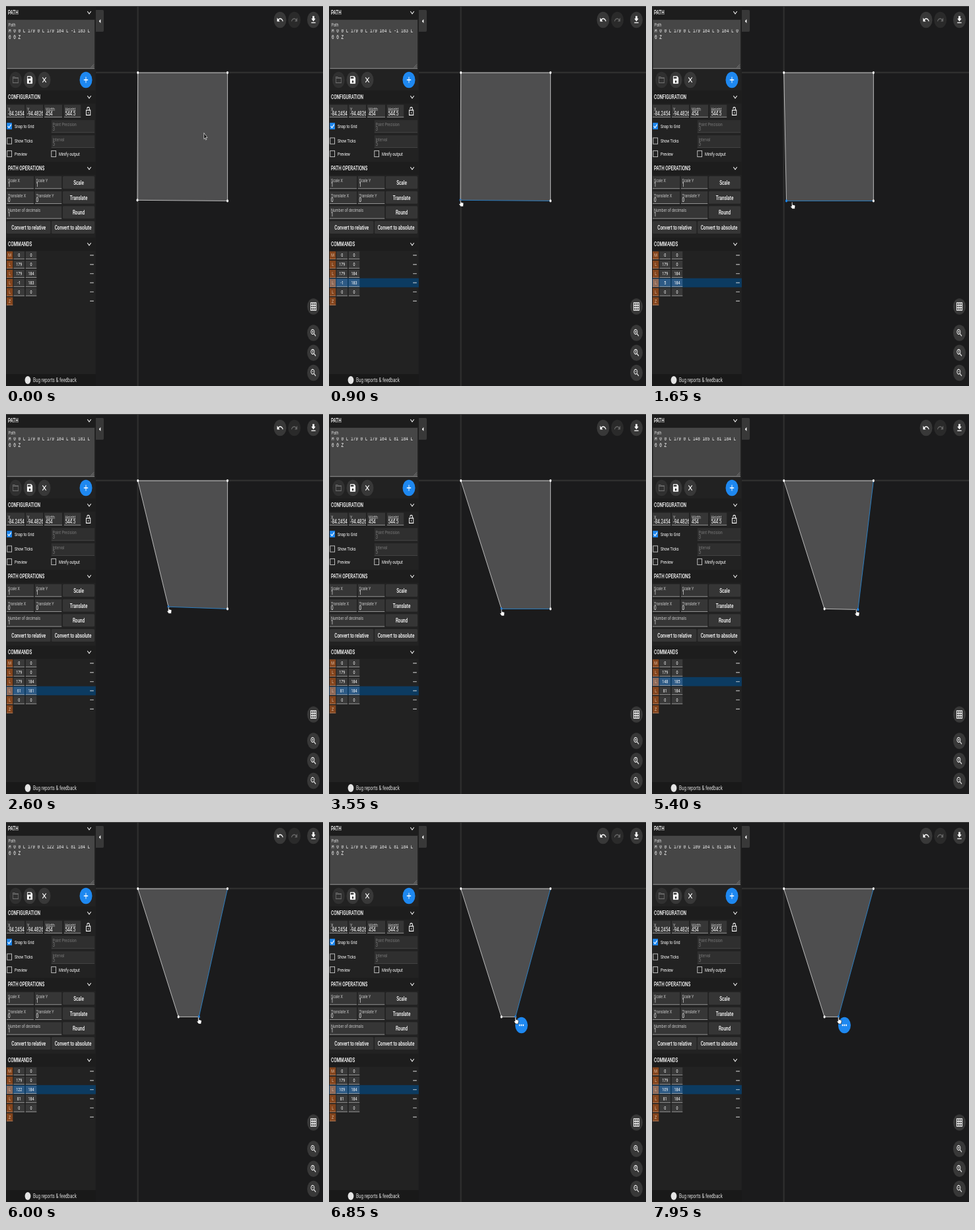
Recreate the animation shown at these times as an HTML page. Size 480 by 576 pixels, loop 8 s.

```html
<!DOCTYPE html>
<html lang="en">
<head>
<meta charset="utf-8">
<title>Path editor</title>
<style>
  html, body { margin: 0; width: 100%; height: 100%; overflow: hidden; background: #1b1b1c; }
  svg { display: block; width: 480px; height: 576px; }
  svg svg { width: auto; height: auto; }
  text { font-family: Roboto, sans-serif; fill: #fff; white-space: pre; }
  .mono { font-family: "Liberation Mono", monospace; }
  .edge { stroke: #dcdcdc; stroke-width: .8; }
  .edge.on { stroke: #2a8fe0; }
  .dot { fill: #fff; }
  .dot.on { fill: #1e88f0; }
  .row .bg { fill: none; }
  .row .type { fill: #84451d; }
  .row .cell { fill: #393939; }
  .row.on .bg { fill: #0c3b61; }
  .row.on .type { fill: #8e6a59; }
  .row.on .cell { fill: #2d5a85; }
</style>
</head>
<body>
<svg id="stage" viewBox="0 0 480 576" xmlns="http://www.w3.org/2000/svg"></svg>
<script>
// The interface is laid out at 1060 x 911 and shown squeezed into 480 x 576.
const SX = 0.453, SY = 0.632, LOOP = 8000, STEP = 50, SIDE = 135.9;
const BLUE = '#1e88f0', DIM = '#777';
const scaled = (x, y) => `translate(${x} ${y}) scale(${SX} ${SY})`;

const rect = (x, y, w, h, fill, extra = '') =>
  `<rect x="${x}" y="${y}" width="${w}" height="${h}" fill="${fill}" ${extra}/>`;
const text = (x, y, str, size = 14, extra = '') =>
  `<text transform="${scaled(x, y)}" font-size="${size}" ${extra}>${str}</text>`;
const centered = (x, y, str, size = 14, extra = '') =>
  text(x, y, str, size, `text-anchor="middle" ${extra}`);
const icon = (x, y, d, color = '#fff', stroke = 0, flip = 1) =>
  `<path transform="${scaled(x, y)} scale(${flip} 1) translate(-12 -12)" d="${d}" ` +
  (stroke ? `fill="none" stroke="${color}" stroke-width="${stroke}"/>` : `fill="${color}"/>`);
const disc = (x, y, fill) => `<ellipse cx="${x}" cy="${y}" rx="9.5" ry="12.2" fill="${fill}"/>`;

const ICONS = {
  undo: 'M12.5 8c-2.65 0-5.05.99-6.9 2.6L2 7v9h9l-3.62-3.62c1.39-1.16 3.16-1.88 5.12-1.88 3.54 0 6.55 2.31 7.6 5.5l2.37-.78C21.08 11.03 17.15 8 12.5 8z',
  download: 'M5 20h14v-2H5v2zM19 9h-4V3H9v6H5l7 7 7-7z',
  folder: 'M3 5h6l2 2h10v12H3zM3 8h18',
  save: 'M17 3H5c-1.1 0-2 .9-2 2v14c0 1.1.9 2 2 2h14c1.1 0 2-.9 2-2V7l-4-4zm-5 16a3 3 0 1 1 0-6 3 3 0 0 1 0 6zm3-10H5V5h10v4z',
  close: 'M6 6L18 18M18 6L6 18',
  plus: 'M12 5v14M5 12h14',
  chevron: 'M6 9l6 6 6-6',
  lock: 'M5 9h14v12H5zM8 6a4 4 0 0 1 8 0v3M12 13.5v3',
  grid: 'M3 3h18v18H3zM3 9h18M3 15h18M9 3v18M15 3v18',
  lens: 'M15.5 14h-.79l-.28-.27A6.5 6.5 0 1 0 13.73 14.43l.27.28v.79l5 4.99L20.49 19l-4.99-5zm-6 0a4.5 4.5 0 1 1 0-9 4.5 4.5 0 0 1 0 9z',
  check: 'M6.5 12l4 4 7.5-8',
  dots: 'M4 10.2h3.6v3.6H4zM10.2 10.2h3.6v3.6h-3.6zM16.4 10.2H20v3.6h-3.6z',
  smallDots: 'M6.5 10.9h2.6v2.2H6.5zM10.7 10.9h2.6v2.2h-2.6zM14.9 10.9h2.6v2.2h-2.6z'
};

const header = (y, title) =>
  rect(0, y, SIDE, 20, '#1d1d1d') + text(3, y + 13.2, title, 14, 'font-weight="500"') +
  icon(126, y + 10, ICONS.chevron, '#fff', 2);

const field = (x, y, w, label, value, off = false) => {
  const fill = off ? `style="fill:${DIM}"` : '';
  return `<svg x="${x}" y="${y}" width="${w}" height="20">` +
    rect(0, 0, w, 19, off ? '#2f2f2f' : '#363636') +
    rect(0, 18.4, w, 0.8, off ? '#4a4a4a' : '#aaa') +
    text(2, 9, label, 12, off ? fill : 'style="fill:#c4c4c4"') +
    text(2, 16.2, value, 14, fill) + '</svg>';
};

const button = (x, y, w, label) =>
  rect(x, y, w, 19, '#353535', 'rx="1.5"') +
  centered(x + w / 2, y + 12.8, label, 14, 'font-weight="500"');

const checkbox = (x, y, label, on = false) =>
  rect(x - 3.4, y - 4.6, 6.8, 9.2, on ? BLUE : 'none', `stroke="${on ? BLUE : '#ccc'}" stroke-width=".9"`) +
  (on ? icon(x, y, ICONS.check, '#fff', 2) : '') + text(x + 7.8, y + 2.8, label, 12);

const ROW_TYPES = ['M', 'L', 'L', 'L', 'L', 'Z'];
const row = (type, i) => {
  const y = 371 + i * 13.9;
  const cell = (x, key) =>
    `<rect class="cell" x="${x}" y="${y + 0.9}" width="16.5" height="12"/>` +
    rect(x, y + 12.2, 16.5, 0.8, '#aaa') + centered(x + 8.2, y + 9.2, '', 12, `data-cell="${key}"`);
  return `<g class="row"><rect class="bg" x="0" y="${y}" width="${SIDE}" height="13.7"/>` +
    `<rect class="type" x="1" y="${y + 0.9}" width="9.3" height="12.1"/>` +
    rect(1, y + 12.2, 9.3, 0.8, '#b98a6c') +
    centered(5.6, y + 9.2, type, 12, 'style="fill:#dfbfa8"') +
    (type === 'Z' ? '' : cell(11.5, 'x') + cell(29.8, 'y')) +
    icon(130, y + 6.8, ICONS.smallDots, '#eee') + '</g>';
};

const round = (x, y, name, stroke, color = '#fff', fill = '#383838', flip = 1) =>
  disc(x, y, fill) + icon(x, y, ICONS[name], color, stroke, flip);

const zoom = (y, mark) => round(465.5, y, 'lens', 0) + icon(465.5, y, mark, '#fff', 1.4);

const sidebar = () =>
  rect(0, 0, SIDE, 576, '#222') +
  header(0, 'PATH') +
  rect(1.5, 21, 132.5, 74, '#464646') + rect(1.5, 94.4, 132.5, 0.8, '#aaa') +
  text(3.5, 31.3, 'Path', 12, 'style="fill:#d4d4d4"') +
  '<path d="M128.5 93.5l4.5-5M131 93.5l2-2.2" stroke="#999" stroke-width=".6"/>' +
  `<svg x="0" y="35.4" width="134" height="58">${[4.6, 14.3].map(y =>
    text(4, y, '', 13.333, 'class="mono line"')).join('')}</svg>` +
  round(14.5, 112, 'folder', 1.8, '#6c6c6c', '#303030') +
  round(36, 112, 'save', 0) +
  round(58, 112, 'close', 2) +
  round(121, 112, 'plus', 2, '#fff', BLUE) +
  header(128, 'CONFIGURATION') +
  field(1, 149.5, 27.5, 'X', '-84.2454') + field(30, 149.5, 26, 'Y', '-94.4826') +
  field(58, 149.5, 27, 'Width', '454') + field(87.5, 149.5, 26, 'Height', '544.5') +
  icon(124.6, 159.8, ICONS.lock, '#fff', 2) +
  checkbox(5.2, 182, 'Snap to Grid', true) + field(68.5, 173, 65.5, 'Point Precision', '3', true) +
  checkbox(5.2, 204.5, 'Show Ticks') + field(68.5, 195.7, 65.5, 'Interval', '5', true) +
  checkbox(5.2, 224, 'Preview') + checkbox(72.2, 224, 'Minify output') +
  header(236, 'PATH OPERATIONS') +
  field(1, 258, 41, 'Scale X', '1') + field(43.5, 258, 41, 'Scale Y', '1') + button(86, 258, 48, 'Scale') +
  field(1, 280.7, 41, 'Translate X', '0') + field(43.5, 280.7, 41, 'Translate Y', '0') + button(86, 280.7, 48, 'Translate') +
  field(1, 303.3, 83.5, 'Number of decimals', '1') + button(86, 303.3, 48, 'Round') +
  button(1, 326, 66.5, 'Convert to relative') + button(69, 326, 65, 'Convert to absolute') +
  header(351, 'COMMANDS') + ROW_TYPES.map(row).join('') +
  rect(0, 558, SIDE, 18, '#191919') +
  '<ellipse cx="33" cy="567" rx="4.4" ry="6" fill="#e4e4e4"/>' +
  text(41, 570.2, 'Bug reports &amp; feedback', 14, 'style="fill:#ddd"');

const canvas = () =>
  rect(SIDE, 0, 480 - SIDE, 576, '#1b1b1c') +
  rect(SIDE, 99.7, 480 - SIDE, 2.4, '#2f2f2f') + rect(198.5, 0, 2.2, 576, '#2f2f2f') +
  '<path id="shape" fill="#fff" fill-opacity=".225"/>' +
  '<line class="edge"/>'.repeat(4) +
  '<ellipse class="dot" rx="1.5" ry="2.1"/>'.repeat(4) +
  `<g id="bubble">${disc(9.1, 12.6, BLUE)}${icon(9.1, 12.6, ICONS.dots)}</g>` +
  `<path d="M${SIDE} 6h10.6q1.5 0 1.5 2v29q0 2-1.5 2h-10.6z" fill="#383838"/>` +
  '<path d="M143.3 20v6l-2.5-3z" fill="#fff"/>' +
  round(415, 21, 'undo', 0) + round(436.6, 21, 'undo', 0, '#666', '#2a2a2a', -1) +
  round(465.5, 21, 'download', 0) + round(465.5, 455.5, 'grid', 2) +
  zoom(495.5, 'M7 9.5h5M9.5 7v5') + zoom(525.7, 'M8.3 8l1.4-1v5.2') + zoom(556, 'M7 9.5h5');

const cursors =
  '<g id="arrow"><path d="M0 0V9.2L1.6 7.6 2.8 10.6 4 10 2.8 7.1H5.2z" fill="#111" stroke="#eee" stroke-width=".7"/></g>' +
  '<g id="hand"><path d="M-.6 0Q.2-.9.9 0V3.6L4 4.3Q5 4.6 4.8 6L4.2 10H.4L-2.2 6.6Q-2.2 5.3-.6 6z" fill="#fff" stroke="#111" stroke-width=".6"/></g>';

const stage = document.getElementById('stage');
stage.innerHTML = canvas() + sidebar() + rect(0, 0, 480, 1, '#4a4a4a') + cursors;

const all = sel => [...stage.querySelectorAll(sel)];
const byId = id => document.getElementById(id);
const [shape, bubble, arrow, hand] = ['shape', 'bubble', 'arrow', 'hand'].map(byId);
const edges = all('.edge'), dots = all('.dot'), rows = all('.row'), lines = all('.line');

// Each key is [time, x, y]; values run straight from one key to the next.
const POINTER = [[0, 299.7, 192.4], [49, 299.7, 192.4], [50, 131, 111], [200, 131, 111], [900, 199, 294],
  [1200, 199, 294], [1650, 212, 297.6], [2600, 246, 292.4], [3350, 261, 296], [3900, 261, 296],
  [4350, 328, 296], [4550, 335, 296], [4750, 335, 296], [5400, 309.3, 296.3], [6300, 282.3, 296]];
const LOWER_LEFT = [[1150, -1, 183], [1650, 5, 184], [2600, 61, 181], [3350, 81, 184]];
const LOWER_RIGHT = [[4750, 179, 184], [5400, 148, 185], [6300, 109, 184]];

function at(keys, t) {
  const next = keys.findIndex(k => k[0] > t);
  if (next === 0) return keys[0].slice(1);
  if (next < 0) return keys[keys.length - 1].slice(1);
  const a = keys[next - 1], b = keys[next], f = (t - a[0]) / (b[0] - a[0]);
  return [a[1] + (b[1] - a[1]) * f, a[2] + (b[2] - a[2]) * f];
}

const toStage = ([x, y]) => [199.7 + x * 0.758, 101.1 + y * 1.056];

function setAttrs(el, attrs) {
  for (const name in attrs) el.setAttribute(name, attrs[name]);
}

function draw(t) {
  const points = [[0, 0], [179, 0], at(LOWER_RIGHT, t).map(Math.round), at(LOWER_LEFT, t).map(Math.round)];
  const spots = points.map(toStage);
  const active = t < 900 ? -1 : t < 4550 ? 3 : 2;

  shape.setAttribute('d', `M${spots.join('L')}Z`);
  edges.forEach((edge, i) => {
    const from = spots[i], to = spots[(i + 1) % 4];
    setAttrs(edge, { x1: from[0], y1: from[1], x2: to[0], y2: to[1] });
    edge.classList.toggle('on', i + 1 === active);
  });
  dots.forEach((dot, i) => {
    setAttrs(dot, { cx: spots[i][0], cy: spots[i][1] });
    dot.classList.toggle('on', i === active);
  });

  const commands = [...points, [0, 0]];
  rows.forEach((r, i) => {
    r.classList.toggle('on', i === active);
    r.querySelectorAll('[data-cell]').forEach((cell, j) => { cell.textContent = commands[i][j]; });
  });

  const path = commands.map((p, i) => `${ROW_TYPES[i]} ${p.join(' ')}`).join(' ') + ' Z';
  const wrap = path.lastIndexOf(' ', 35);
  lines[0].textContent = path.slice(0, wrap);
  lines[1].textContent = path.slice(wrap + 1);

  const menu = (t >= 3900 && t < 4550) || t >= 6500;
  bubble.style.display = menu ? '' : 'none';
  if (menu) bubble.setAttribute('transform', `translate(${spots[active]})`);

  const grabbing = (t >= 900 && t < 3950) || t >= 4550;
  arrow.style.display = grabbing ? 'none' : '';
  hand.style.display = grabbing ? '' : 'none';
  (grabbing ? hand : arrow).setAttribute('transform', `translate(${at(POINTER, t)})`);
}

function tick() {
  const t = performance.now() % LOOP;
  draw(t - t % STEP);
  requestAnimationFrame(tick);
}
tick();
</script>
</body>
</html>
```
